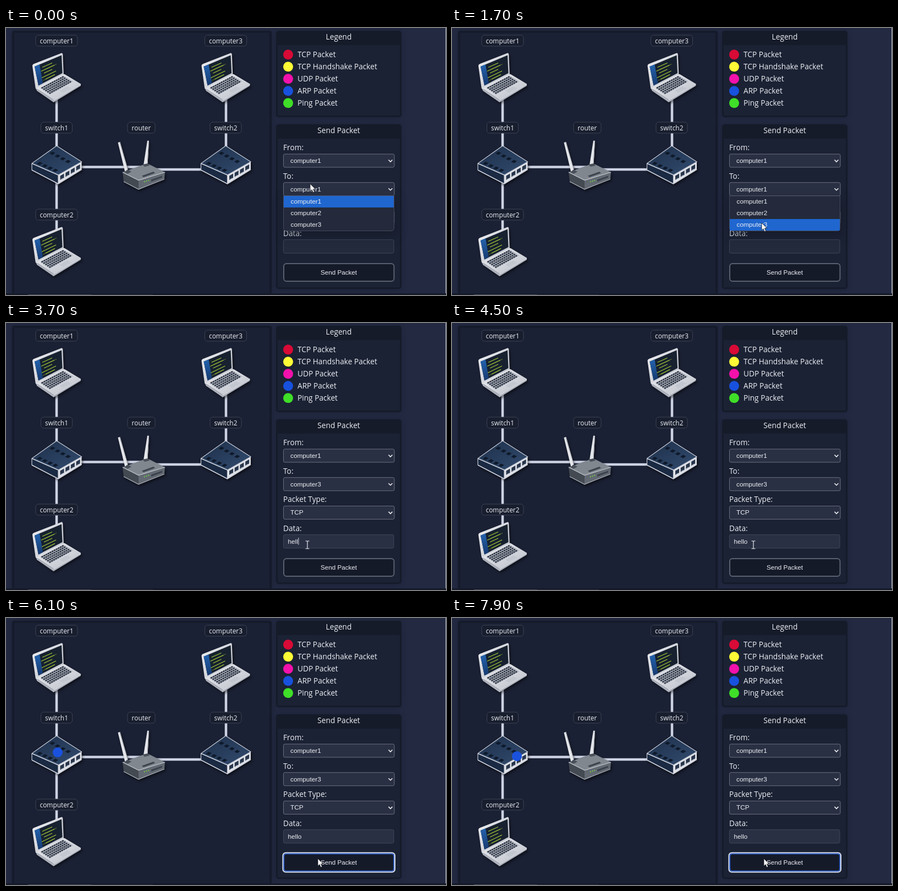
These frames come from a looping animation (800 by 485 pixels, 8000 ms). An HTML page:

```html
<!DOCTYPE html>
<html lang="en">
<head>
<meta charset="utf-8">
<title>Network packet simulator</title>
<style>
html, body { margin: 0; width: 100%; height: 100%; overflow: hidden; background: #222941; }
svg { display: block; width: 800px; height: 485px; }
text { fill: #eef0f5; font-family: "Open Sans", "Noto Sans", sans-serif; font-size: 13.7px; }
.tag text { font-size: 11.9px; text-anchor: middle; }
.tag rect { fill: #181e2e; stroke: #3b4253; }
.form { font-family: "Liberation Sans", Arial, sans-serif; font-size: 11.8px; }
.mid { text-anchor: middle; }
.box { fill: #2a3043; stroke: #6a7080; }
.panel { filter: drop-shadow(0 0 5px rgba(18, 23, 38, .45)); }
.device { filter: drop-shadow(2px 3px 2px rgba(0, 0, 0, .5)); }
.links { stroke: #cdd2e3; stroke-width: 4.5; fill: none; }
.menu { filter: drop-shadow(3px 7px 9px rgba(15, 19, 32, .5)); }
</style>
</head>
<body>
<svg viewBox="0 0 800 485">
  <defs>
    <linearGradient id="metal" x2="1" y2="1">
      <stop offset="0" stop-color="#f0f1f4"/><stop offset="1" stop-color="#b9bdc7"/>
    </linearGradient>
    <linearGradient id="navy" x2="1" y2="1">
      <stop offset="0" stop-color="#1d2f49"/><stop offset="1" stop-color="#334c70"/>
    </linearGradient>
    <linearGradient id="bar" x2="0" y2="1">
      <stop offset="0" stop-color="#2363ae"/><stop offset="1" stop-color="#173a70"/>
    </linearGradient>

    <g id="laptop" class="device">
      <path d="M48 69 Q48 66 51 65 L101 45.500 Q103 45 103.300 48 L105 87 L57 112 Q54 112 53.500 108Z" fill="url(#metal)"/>
      <path d="M52 70 L101 49.500 L102.500 82 L59 104.500Z" fill="#17212f"/>
      <path d="M52 70 L61 66.200 L67 100.400 L59 104.500Z" fill="url(#bar)"/>
      <g stroke="#a3cb36" stroke-width="1.200" fill="none">
        <path d="M66 71.500 L84 63.500 M64 78.500 L88 67.500 M69 82 L84 75 M65 90.500 L91 78 M72 93 L89 84.500"/>
        <path d="M67 95.500 L88 84.800 M70 75.500 L92 65.500" stroke-width=".8" opacity=".7"/>
      </g>
      <path d="M55 109.500 L86.500 130.500 L136 101.500 V105 L86.500 135 L56 114Z" fill="#aeb3be"/>
      <path d="M55 109.500 L104.500 84 Q106 83.500 107.500 84.500 L136 101.500 L86.500 130.500Z" fill="url(#metal)"/>
      <path d="M62 109 L105 86.500 L122.500 97 L80 121Z" fill="#b9bec9"/>
      <g stroke="#323946" stroke-width="2.700" stroke-dasharray="3.300 .9">
        <path d="M64.500 109.300 L104.700 88.200"/><path d="M68 111.700 L108.300 90.400"/>
        <path d="M71.500 114.100 L111.900 92.600"/><path d="M75 116.500 L115.500 94.700"/>
        <path d="M78.500 118.900 L119 96.700"/>
      </g>
      <path d="M98 115.500 L112 107.500 L120 111 L105 119.500Z" fill="#c3c7d0" transform="translate(-1 -1.500)"/>
      <path d="M86.500 131 L136 102" stroke="#f4f5f8" stroke-width="1"/>
    </g>

    <g id="switch" class="device">
      <path d="M47 246 L95 267 V283 L47 258Z" fill="#1b2a43"/>
      <path d="M95 267 L137.500 243 V257 L95 283Z" fill="#e0e2e8"/>
      <path d="M47 246 L92 214 L137.500 243 L95 267Z" fill="url(#navy)"/>
      <path d="M47 258 V246 L92 214 L137.500 243 L95 267 V283" fill="none" stroke="#c8cdd8" stroke-width="1.200"/>
      <path d="M47 246 L95 267 M47 258 L95 283 L137.500 257" fill="none" stroke="#cfd3dd" stroke-width="1.600"/>
      <g id="slots" fill="#0f1a2b"></g>
      <g id="ports"></g>
    </g>

    <g id="router" class="device">
      <path d="M203.500 208 L207.500 207 L222 259 L216.500 262Z" fill="#e4e6ea"/>
      <path d="M257 204.500 L260 205 L257.500 248 L250 249Z" fill="#e4e6ea"/>
      <path d="M207 208 L222 259 M259.500 206 L257 248" stroke="#9da2ac" stroke-width="1"/>
      <path d="M212 262 L241 276 V293 L214 279Z" fill="#444a52"/>
      <path d="M241 276 L289 262 L288 274 L241 293Z" fill="#626972"/>
      <path d="M212 262 L253 247 Q257 246 261 248 L289 262 L241 276.500Z" fill="#80878f"/>
      <path d="M212 262 L241 276.500 L289 262" fill="none" stroke="#c0c5cb" stroke-width="1.300"/>
      <path d="M214 279 L241 293 L288 274.500" fill="none" stroke="#b2b7be" stroke-width="1.300"/>
      <path d="M247 268.500 L268 261 L271 263.500 L250 271Z" fill="#3f454e"/>
      <path d="M215 262 L221 257 L228 261 L221 265Z" fill="#4a5059"/>
      <path d="M248 248 L258 246 L261 250 L252 252Z" fill="#4a5059"/>
      <path d="M251 279.500 L262 275.800" stroke="#70d63e" stroke-width="2" stroke-dasharray="1.600 2.400"/>
      <path d="M264 275.500 L284 268.500 V271.500 L264 279Z" fill="#3b424c"/>
    </g>
  </defs>

  <rect width="800" height="485" fill="#222941"/>
  <rect x="799" width="1" height="482" fill="#a9aebd"/>
  <g class="panel">
    <rect x="11" y="5" width="472" height="478" rx="4" fill="#151b2a"/>
    <rect x="15" y="9" width="464" height="476" fill="#1b2134"/>
  </g>
  <rect y="482" width="800" height="3" fill="#141a29"/>
  <rect x="40" y="484" width="115" height="1" fill="#4b5262"/>
  <rect x="155" y="484" width="112" height="1" fill="#2a3040"/>

  <path class="links" d="M92 90 V407 M400 90 V250 M92 252.500 H246 M246 257 H400"/>
  <use href="#laptop"/><use href="#laptop" x="307.500"/><use href="#laptop" y="316"/>
  <use href="#switch"/><use href="#switch" x="307.500"/>
  <use href="#router"/>
  <g id="tags" class="tag"></g>
  <g id="packets" fill="#1a52dd"></g>

  <g class="panel">
    <rect x="491" y="5" width="228" height="157" rx="5" fill="#151b29"/>
    <rect x="494" y="31" width="222" height="128" fill="#1b2234"/>
    <rect x="491" y="175" width="228" height="299" rx="5" fill="#151b29"/>
    <rect x="494" y="201" width="222" height="270" fill="#1b2234"/>
  </g>
  <text class="mid" x="605" y="21">Legend</text>
  <text class="mid" x="605" y="191">Send Packet</text>
  <g id="legend"></g>
  <g id="form"></g>
  <rect id="field" x="504.500" y="384.500" width="200.500" height="24.500" rx="2.500" stroke="#3f4658"/>
  <text id="typed" class="form" x="512.500" y="400.500"></text>
  <path id="caret" d="M0 390 V403" stroke="#d5d9e2" stroke-width="1"/>

  <rect x="505" y="428" width="200.500" height="32" rx="5" fill="#151a29" stroke="#59606f" stroke-width="2"/>
  <g id="ring" fill="none">
    <rect x="503.500" y="426.500" width="203.500" height="35" rx="5" stroke="#e3e9f6" stroke-width="2"/>
    <rect x="505.300" y="428.300" width="199.900" height="31.400" rx="4" stroke="#2f62cf" stroke-width="1.800"/>
  </g>
  <text class="form mid" x="605" y="447.500" style="font-size:11.650px">Send Packet</text>

  <g id="menu" class="menu">
    <path d="M504.500 305 H705.500 V363 Q705.500 368.500 700 368.500 H510 Q504.500 368.500 504.500 363Z" fill="#242a3b" stroke="#444b5c"/>
    <rect id="mark" x="505" width="200" height="21" fill="#1f66cf"/>
  </g>

  <path id="arrow" d="M0 0 V13.500 L3.100 10.700 L5.300 15.800 L7.700 14.800 L5.500 9.800 H9.600Z" fill="#fff" stroke="#10131c" stroke-width=".8"/>
  <path id="beam" d="M-3.500 -7 H-1 L0 -6 L1 -7 H3.500 M0 -6 V6 M-3.500 7 H-1 L0 6 L1 7 H3.500" fill="none" stroke="#e8eaf0" stroke-width="1.200"/>
</svg>

<script>
const LOOP = 8000, STEP = 100;
const $ = id => document.getElementById(id);

function add(parent, name, attrs, text) {
  const el = document.createElementNS("http://www.w3.org/2000/svg", name);
  for (const key in attrs) el.setAttribute(key, attrs[key]);
  if (text) el.textContent = text;
  return parent.appendChild(el);
}
const show = (el, on) => el.setAttribute("visibility", on ? "visible" : "hidden");
const place = (el, x, y) => el.setAttribute("transform", `translate(${x} ${y})`);

for (let i = 0; i < 4; i++) {
  const slot = (x, y) => add($("slots"), "path", { d: `M${x} ${y} l5 -3.500 l5.500 2.500 l-5 3.500Z` });
  slot(56 + i * 9.5, 246.5 + i * 4.2);
  slot(79 + i * 9.5, 228 + i * 5);
  const x = 98.5 + i * 9.7, y = 268.5 - i * 5.55;
  add($("ports"), "path", { d: `M${x} ${y} l7 -4 v7.500 l-7 4Z`, fill: "#27354b" });
  add($("ports"), "path", { d: `M${x + 1} ${y + 6.5} l4 -2.300`, stroke: "#8c95a6" });
}

for (const [name, x, y, w] of [
  ["computer1", 92, 23, 76], ["computer3", 399.5, 23, 76], ["computer2", 92, 339, 76],
  ["switch1", 92, 181, 57], ["switch2", 399.5, 181, 57], ["router", 246, 181, 50]
]) {
  add($("tags"), "rect", { x: x - w / 2, y: y - 10, width: w, height: 20, rx: 5 });
  add($("tags"), "text", { x, y: y + 4.5 }, name);
}

[["TCP", "#d80a36"], ["TCP Handshake", "#fdfb36"], ["UDP", "#f211ab"], ["ARP", "#1751dd"], ["Ping", "#3fde28"]]
  .forEach(([name, fill], i) => {
    const y = 48.3 + i * 22;
    add($("legend"), "circle", { cx: 513, cy: y, r: 9, fill });
    add($("legend"), "text", { x: 530, y: y + 5 }, name + " Packet");
  });

const selects = [["From:", "computer1"], ["To:", "computer1"], ["Packet Type:", "TCP"]].map(([label, value], i) => {
  const y = 229 + i * 51.7, form = $("form");
  add(form, "text", { x: 504, y: y - 7 }, label);
  add(form, "rect", { class: "box", x: 504.5, y, width: 201.5, height: 24, rx: 2.5 });
  add(form, "path", { d: `M695.500 ${y + 10.5} l3.500 3.500 l3.500 -3.500`, fill: "none", stroke: "#eef0f5", "stroke-width": 1.6 });
  return add(form, "text", { class: "form", x: 517, y: y + 16 }, value);
});
add($("form"), "text", { x: 504, y: 378 }, "Data:");

["computer1", "computer2", "computer3"].forEach((name, i) =>
  add($("menu"), "text", { class: "form", x: 517.5, y: 319 + i * 21 }, name));

// time, x, y of the pointer
const pointer = [
  [0, 553, 283], [300, 553, 285], [800, 556, 318], [1300, 563, 351], [1700, 563, 354],
  [2000, 563, 354], [2500, 548, 403], [4600, 548, 403], [5000, 567, 437], [LOOP, 567, 437]
];
const PICK = 1900, FOCUS = 2600, CLICK = 5100;
const keys = [3200, 3400, 3600, 3700, 3900];

const C1 = [94, 95], C2 = [94, 406], SW = [94, 251], RT = [246, 251];
const trips = [
  [5183, 960, C1, SW],
  [6163, 960, SW, C1], [6163, 960, SW, C2], [6163, 960, SW, RT],
  [7123, 923, RT, SW]
];
const dots = trips.map(() => add($("packets"), "circle", { r: 9 }));

const mix = (a, b, k) => a + (b - a) * k;

function pointerAt(t) {
  const i = pointer.findIndex(p => p[0] > t);
  const [t0, x0, y0] = pointer[i - 1], [t1, x1, y1] = pointer[i];
  const k = (t - t0) / (t1 - t0);
  return [mix(x0, x1, k), mix(y0, y1, k)];
}

function draw(t) {
  const [x, y] = pointerAt(t);
  const open = t < PICK;
  const overField = !open && y > 384 && y < 410;
  place($("arrow"), x, y);
  place($("beam"), x, y);
  show($("arrow"), !overField);
  show($("beam"), overField);

  show($("menu"), open);
  $("mark").setAttribute("y", 305 + 21 * Math.max(0, Math.min(2, Math.floor((y - 305) / 21))));
  selects[1].textContent = open ? "computer1" : "computer3";

  const count = keys.filter(k => k <= t).length;
  $("typed").textContent = "hello".slice(0, count);
  $("field").setAttribute("fill", count ? "#2a3043" : "#232a3c");
  const since = t - (count ? keys[count - 1] : FOCUS);
  show($("caret"), t >= FOCUS && t < CLICK && since % 1000 < 500);
  place($("caret"), 513.5 + $("typed").getComputedTextLength(), 0);

  show($("ring"), t >= CLICK);
  trips.forEach(([start, span, from, to], i) => {
    const k = (t - start) / span;
    show(dots[i], k >= 0 && k < 1);
    place(dots[i], mix(from[0], to[0], k), mix(from[1], to[1], k));
  });
}

const begin = performance.now();
function tick() {
  const t = (performance.now() - begin) % LOOP;
  draw(Math.floor(t / STEP) * STEP);
  requestAnimationFrame(tick);
}
tick();
</script>
</body>
</html>
```
